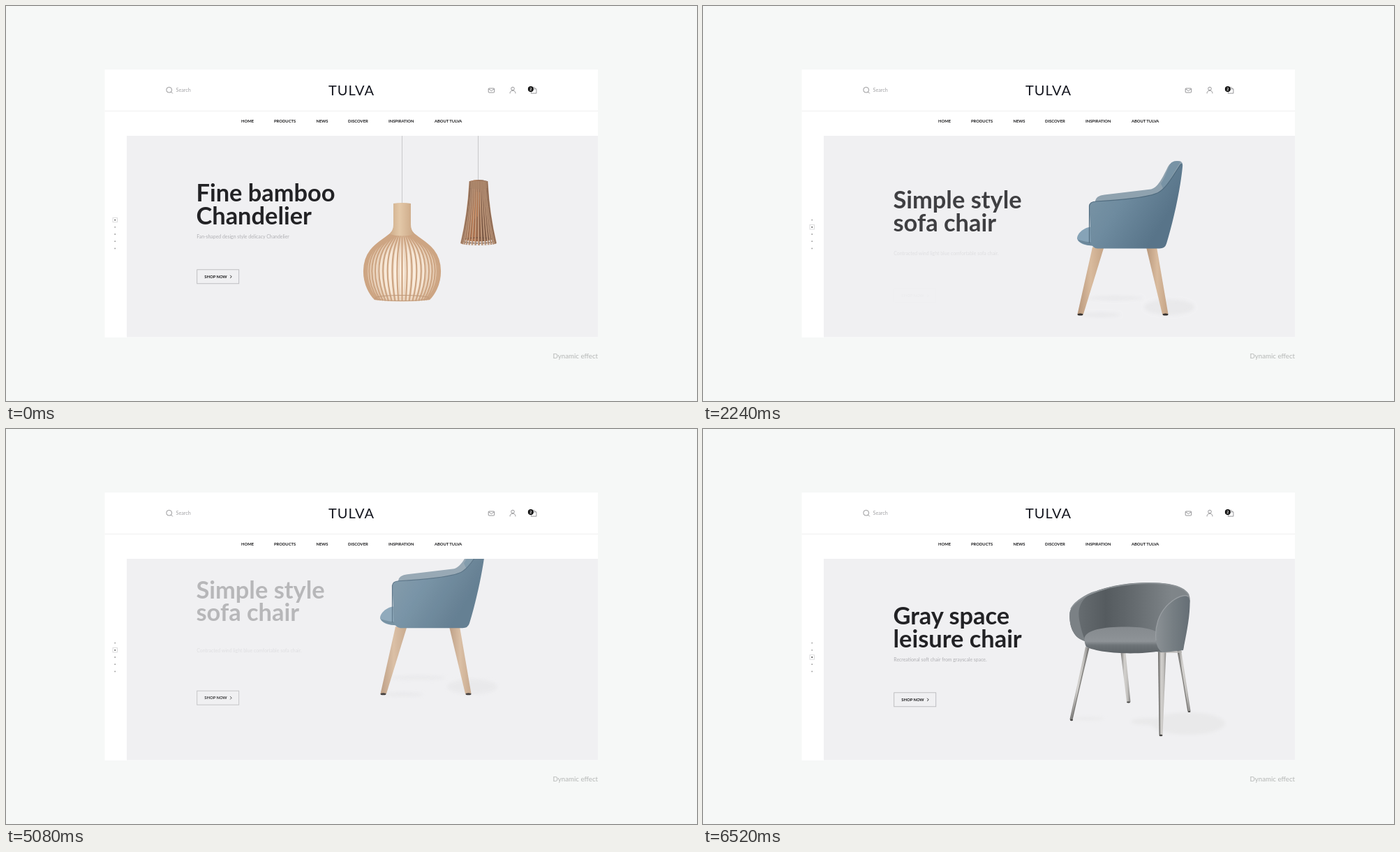
Recreate the animation shown at these times as an HTML page. Size 990 by 566 pixels, loop 8000 ms.

```html
<!DOCTYPE html>
<html lang="en">
<head>
<meta charset="utf-8">
<title>Furniture shop slider</title>
<style>
  html, body { margin: 0; width: 100%; height: 100%; overflow: hidden; background: #f6f8f7; }
  svg { display: block; width: 100vw; height: 100vh; font-family: Lato, sans-serif; }
  .title { font-size: 34.4px; font-weight: 700; fill: #222225; }
  .sub { font-size: 6.9px; fill: #b0b0b4; }
  .label { font-size: 5.8px; font-weight: 700; fill: #161618; }
  .icon { fill: none; stroke: #8b8b8e; stroke-width: .9; stroke-linejoin: round; }
</style>
</head>
<body>
<svg viewBox="0 0 990 566">
  <defs>
    <clipPath id="pane"><rect x="173" y="186" width="675" height="289"/></clipPath>
    <radialGradient id="glow" cy=".6">
      <stop offset="0" stop-color="#fff3e4"/><stop offset=".6" stop-color="#f6e6d5"/><stop offset="1" stop-color="#dfc2a6"/>
    </radialGradient>
    <linearGradient id="neck">
      <stop offset="0" stop-color="#cfad8a"/><stop offset=".4" stop-color="#e3c8a8"/><stop offset="1" stop-color="#c9a583"/>
    </linearGradient>
    <linearGradient id="shade">
      <stop offset="0" stop-color="#a07457"/><stop offset=".35" stop-color="#c07a50"/><stop offset=".6" stop-color="#7d5a46"/><stop offset="1" stop-color="#94705a"/>
    </linearGradient>
    <linearGradient id="blue" x2=".9" y2=".5">
      <stop offset="0" stop-color="#8098a8"/><stop offset=".5" stop-color="#6d8b9f"/><stop offset="1" stop-color="#577489"/>
    </linearGradient>
    <linearGradient id="wood">
      <stop offset="0" stop-color="#b8977b"/><stop offset=".5" stop-color="#d9bb9e"/><stop offset="1" stop-color="#c4a385"/>
    </linearGradient>
    <linearGradient id="gray">
      <stop offset="0" stop-color="#6c7276"/><stop offset=".3" stop-color="#555b5f"/><stop offset=".55" stop-color="#666c70"/><stop offset=".85" stop-color="#7f8589"/>
    </linearGradient>
    <linearGradient id="arm">
      <stop offset="0" stop-color="#8b9195"/><stop offset=".5" stop-color="#767e83"/><stop offset="1" stop-color="#656e75"/>
    </linearGradient>
    <linearGradient id="seat" x2="0" y2="1">
      <stop offset="0" stop-color="#858a8e"/><stop offset=".55" stop-color="#8e9397"/><stop offset=".7" stop-color="#6d7377"/><stop offset="1" stop-color="#5c6266"/>
    </linearGradient>
    <linearGradient id="steel">
      <stop offset="0" stop-color="#737270"/><stop offset=".4" stop-color="#d3d1ce"/><stop offset=".7" stop-color="#c3c1be"/><stop offset="1" stop-color="#838280"/>
    </linearGradient>
    <filter id="soft"><feGaussianBlur stdDeviation="2.5"/></filter>
  </defs>

  <rect width="990" height="566" fill="#f6f8f7"/>
  <rect x="141.5" y="91" width="706.5" height="384" fill="#fff"/>
  <path d="M141.5 150.5H848" stroke="#efefef"/>
  <rect x="173" y="186" width="675" height="288.5" fill="#f0f0f2"/>

  <g class="icon">
    <circle cx="233.7" cy="120.2" r="3.9"/><path d="M236.5 123l2.3 2.4"/>
    <rect x="691.2" y="118" width="8.4" height="6" rx=".8"/><path d="M691.5 118.8l3.9 2.8 3.9-2.8"/>
    <circle cx="726" cy="118.5" r="2.3"/><path d="M722 125.3c0-5.6 8-5.6 8 0"/>
    <path d="M752.3 118.8h7.6v6.3h-7.6zM754 118.8c0-3.2 4.2-3.2 4.2 0"/>
  </g>
  <circle cx="751.8" cy="119" r="4" fill="#111"/>
  <text x="751.8" y="121.2" font-size="6" font-weight="700" fill="#fff" text-anchor="middle">2</text>
  <text x="243.5" y="123.4" font-size="7.2" fill="#a4a4a7">Search</text>
  <text x="462" y="128" font-size="20" letter-spacing="1" fill="#14161f">TULVA</text>
  <text x="848" y="504.6" font-size="9.7" fill="#b4b6b5" text-anchor="end">Dynamic effect</text>
  <g id="nav" class="label"></g>
  <g id="dots" fill="#333"></g>
  <rect id="marker" x="153" width="6.4" height="6.4" fill="none" stroke="#cfcfd1" stroke-width=".7"/>
  <g id="slides" clip-path="url(#pane)"></g>
</svg>

<script>
const LOOP = 8000;
const byId = id => document.getElementById(id);
const range = (n, fn) => Array.from({ length: n }, (_, i) => fn(i));
const clamp = v => Math.min(1, Math.max(0, v));
const smooth = p => p * p * (3 - 2 * p);
const glide = p => p < .5 ? (2 * p) ** 2.3 / 2 : 1 - (2 - 2 * p) ** 2.3 / 2;
const settle = p => 1 - (1 - p) ** 2.3;

// Slats are spread evenly around a round lamp and seen from the front.
const slats = (n, path, turn = 0) =>
  range(n, i => path(Math.sin(((i + turn) / (n - 1) - .5) * Math.PI))).join('');

const globeRib = k => `M${567.5 + 12 * k} 319C${567.5 + 14 * k} 334 ${567.5 + 54.5 * k} 338 ${567.5 + 54.5 * k} 380`
  + `C${567.5 + 54.5 * k} 400 ${567.5 + 45 * k} 414 ${567.5 + 39 * k} ${420 + 3 * Math.sqrt(1 - k * k)}`;
const coneSlat = k => {
  const drop = 3 * Math.sqrt(Math.max(0, 1 - k * k));
  return `M${677 + 12.5 * k} 251C${677 + 14 * k} 285 ${677 + 19 * k} 315 ${677 + 25 * k} ${340 + drop}`;
};

const globeLamp = `
  <path d="M567.5-120V283" stroke="#c9c9cb"/>
  <path d="M555.5 319C553.5 334 513 338 513 380C513 400 522.5 414 529 421Q567 426 606 421C612.5 414 622 400 622 380C622 338 581.5 334 579.5 319Z" fill="url(#glow)"/>
  <g fill="none">
    <path d="${slats(21, globeRib, .5)}" stroke="#e6cfb8" stroke-width="1.3"/>
    <path d="${slats(25, globeRib)}" stroke="#cda583" stroke-width="2.2"/>
    <ellipse cx="567.5" cy="418.5" rx="39" ry="4" stroke="#c09a7b"/>
  </g>
  <path d="M555 283Q567.5 281 580 283V313Q580 322 585 327Q567 332 550 327Q555 322 555 313Z" fill="url(#neck)"/>`;

const coneLamp = `
  <path d="M676.5-120V250" stroke="#c9c9cb"/>
  <path d="M664.5 251Q677 247 689.5 251C691 285 696 315 701 334Q677 341 653 334C658 315 663 285 664.5 251Z" fill="url(#shade)"/>
  <path d="M672 266L680 267L678 300Q670 305 667 312Z" fill="#e08a52" opacity=".55"/>
  <g fill="none">
    <ellipse cx="677" cy="336" rx="23.5" ry="4" stroke="#654b3d"/>
    <path d="${slats(17, coneSlat)}" stroke="#c59e80" stroke-width="2"/>
    <path d="${slats(17, coneSlat, .3)}" stroke="#72513f" stroke-width=".7" opacity=".8"/>
  </g>
  <path d="M664.5 251Q677 247 689.5 251V261Q677 264 664.5 261Z" fill="#a98469" opacity=".65"/>`;

const blueChair = `
  <g fill="#e9e9eb" filter="url(#soft)">
    <ellipse cx="668" cy="430" rx="36" ry="11"/><ellipse cx="590" cy="417" rx="40" ry="3"/><ellipse cx="570" cy="441" rx="28" ry="3"/>
  </g>
  <g fill="url(#wood)">
    <path d="M558 344H574.5L545 440H536.5Z"/><path d="M635 344H650L666.5 440H658Z"/>
  </g>
  <g fill="#332f2d"><ellipse cx="540.5" cy="440.5" rx="4" ry="1.5"/><ellipse cx="662.5" cy="440.5" rx="4" ry="1.5"/></g>
  <path d="M562 282C561 273 567 270 575 269L642 261C653 258 660 241 666 229Q671 220 680 220.5Q687 220 687 226L660 270L600 286Z" fill="#8fa2af"/>
  <path d="M656 253C663 243 666 229 671 223Q677 219 684 222L660 262Z" fill="#7893a5"/>
  <path d="M556 315C545 316 535.5 325 536 332C538 339 549 342 559 342Z" fill="#86a3b7"/>
  <path d="M537 333Q548 337 558 337V342Q540 340 537 333Z" fill="#6b889b"/>
  <path d="M553.5 285Q554 279 563 278.5C600 277 640 272 652 266C666 258 675 238 683 226Q688 221 687 229C684 262 673 310 664 339Q662 346 654 346H565Q557 345 555.5 336Z" fill="url(#blue)"/>
  <path d="M553.5 338V285Q554 279 563 278.5C600 277 640 272 652 266C666 258 675 238 685 225" fill="none" stroke="#4f6b7f" stroke-width="1.2"/>`;

const grayChair = `
  <g fill="#e9e9ea" filter="url(#soft)">
    <ellipse cx="695" cy="422" rx="53" ry="16"/><ellipse cx="551" cy="415" rx="24" ry="2"/><ellipse cx="638" cy="419" rx="25" ry="5"/>
  </g>
  <g fill="url(#steel)">
    <path d="M598 316H605L612.5 391Q610 394 607 391Z"/><path d="M679 316H685L698.5 404Q697 407 694 404Z"/>
    <path d="M548 312L553.5 314L529.5 417Q527 419 525.5 416Z"/><path d="M652 317H663.5L658.5 438Q656 441 653.5 438Z"/>
  </g>
  <g fill="none" stroke="#6d6c6a">
    <path d="M552 314L528.8 416M653 320L654.3 438M681 318L695 404"/><path d="M656 319.5H686" stroke="#b5b3b0" stroke-width="2"/>
  </g>
  <g fill="#454443"><ellipse cx="528" cy="417" rx="2" ry="1.2"/><ellipse cx="656" cy="439" rx="2.5" ry="1.3"/><ellipse cx="609.5" cy="391.5" rx="2.5" ry="1"/><ellipse cx="696.5" cy="405" rx="2" ry="1"/></g>
  <path d="M525.5 263C530 239 582 220 638 220C689 220 699 234 697.5 247L688 316L656 320L548 304C530 300 524 281 525.5 263Z" fill="url(#gray)"/>
  <path d="M525.5 263C528 250 543 239 562 232C543 242 536 254 539 273Q542 291 548 304C530 300 524 281 525.5 263Z" fill="#7b8185"/>
  <path d="M527 258C538 237 588 221 638 221C672 221 690 227 696 238" fill="none" stroke="#8d9397" stroke-width="1.6"/>
  <path d="M546.5 299C550 287 576 283 610 283.5C640 284 655 290 656 299V318C622 324 568 322 549 312Q546 306 546.5 299Z" fill="url(#seat)"/>
  <path d="M697.5 246C695 234 680 239 668 250C652 264 647 285 649 303Q651 319 661 320L688 317C692 295 698 270 697.5 246Z" fill="url(#arm)"/>
  <path d="M696 240C690 236 678 241 668 250C652 264 647 285 649 303" fill="none" stroke="#9a9fa3" stroke-width="1.2"/>`;

const slides = [
  { title: ['Fine bamboo', 'Chandelier'], sub: 'Fan-shaped design style delicacy Chandelier', art: [globeLamp, coneLamp] },
  { title: ['Simple style', 'sofa chair'], sub: 'Contracted wind light blue comfortable sofa chair.', art: [blueChair] },
  { title: ['Gray space', 'leisure chair'], sub: 'Recreational soft chair from grayscale space.', art: [grayChair] },
];

// Each change begins at `at`; its text follows `lag` ms later.
const changes = [{ at: 520, lag: 240 }, { at: 4440, lag: 0 }];

// leave and enter: delay, duration, distance
const parts = {
  title: { leave: [0, 880, 60], enter: [1040, 640, 60], fade: 1 },
  sub: { leave: [0, 880, 20], enter: [1280, 640, 43], fade: 1 },
  button: { leave: [280, 700, 7], enter: [1440, 640, 30], fade: 3 },
};
const artLeave = [[0, 1866, 288], [450, 1000, 170]];
const artEnter = [840, 1000, 200];

byId('nav').innerHTML = [[337, 'HOME'], [384, 'PRODUCTS'], [444.5, 'NEWS'], [490, 'DISCOVER'], [548, 'INSPIRATION'], [614, 'ABOUT TULVA']]
  .map(([x, name]) => `<text x="${x}" y="167.3">${name}</text>`).join('');

byId('dots').innerHTML = range(5, i => `<circle cx="156.2" cy="${306.6 + 10.2 * i}" r=".9"/>`).join('');

byId('slides').innerHTML = slides.map(s => `<g>
  ${s.art.map(a => `<g class="art">${a}</g>`).join('')}
  <g class="title">${s.title.map((line, i) => `<text x="272.5" y="${280 + 32.5 * i}">${line}</text>`).join('')}</g>
  <g class="sub"><text x="273.3" y="332.7">${s.sub}</text></g>
  <g class="button">
    <rect x="273.7" y="377.8" width="60" height="20" fill="none" stroke="#b9b9bc" stroke-width=".9"/>
    <text class="label" x="284.3" y="390">SHOP NOW</text>
    <path d="M321.2 385.8l2 2.1-2 2.1" fill="none" stroke="#222" stroke-width=".9"/>
  </g></g>`).join('');

const groups = [...byId('slides').children];
const dots = [...byId('dots').children];

function place(el, y, alpha) {
  el.setAttribute('transform', `translate(0 ${y.toFixed(2)})`);
  el.setAttribute('opacity', alpha.toFixed(3));
}

function progress(t, change, delay, duration, fallback) {
  return change ? clamp((t - change.at - delay) / duration) : fallback;
}

function drawSlide(group, i, t) {
  const arrive = changes[i - 1], depart = changes[i];
  group.querySelectorAll('.art').forEach((el, n) => {
    const leave = artLeave[n];
    const shown = settle(progress(t, arrive, artEnter[0], artEnter[1], 1));
    const gone = glide(progress(t, depart, leave[0], leave[1], 0));
    place(el, artEnter[2] * (1 - shown) - leave[2] * gone, shown * (1 - gone ** 1.5));
  });
  for (const [name, { leave, enter, fade }] of Object.entries(parts)) {
    const shown = progress(t, arrive, enter[0] + (arrive?.lag ?? 0), enter[1], 1);
    const gone = progress(t, depart, leave[0] + (depart?.lag ?? 0), leave[1], 0);
    place(group.querySelector('.' + name),
      enter[2] * (1 - shown) ** 1.5 - leave[2] * gone ** 1.5,
      smooth(clamp(1.1 * shown)) * (1 - gone ** fade));
  }
}

function render(now) {
  const t = now % LOOP;
  groups.forEach((group, i) => drawSlide(group, i, t));
  const position = changes.reduce((sum, c) => sum + smooth(progress(t, c, 960, 480, 0)), 0);
  byId('marker').setAttribute('y', 303.4 + 10.2 * position);
  dots.forEach((dot, i) => dot.setAttribute('opacity', i === Math.floor(position + .05) ? 1 : .5));
}

const start = performance.now();
function tick() {
  render(performance.now() - start);
  requestAnimationFrame(tick);
}
tick();
</script>
</body>
</html>
```
